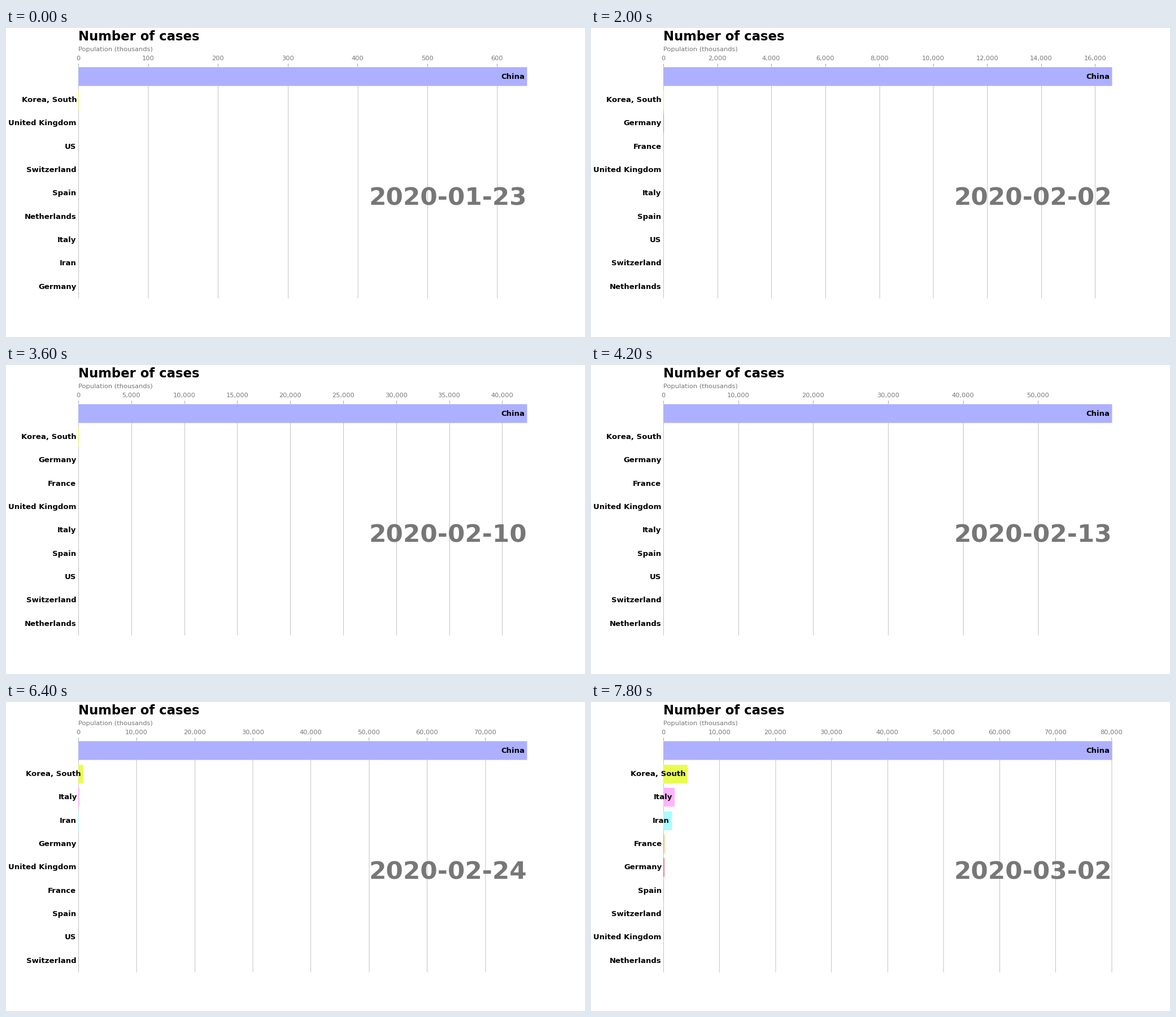
Write a matplotlib script that moves like this. It is 1025 by 547 pixels and loops after 8 s.

```python
import numpy as np
import matplotlib.pyplot as plt
from matplotlib.animation import FuncAnimation
from matplotlib.ticker import StrMethodFormatter

WIDTH, HEIGHT = 1025, 547
DAYS, STEP_MS = 40, 200
START = np.datetime64("2020-01-23")
GREY = "#777777"

# Bars and grid sit on whole cells of a plot area 837 wide and 434.88 high.
CELLS = 837
EDGE = 0.498                       # half a bar plus its margin, in rows
ROW_CELLS = 434.88 / (9 + 2 * EDGE)

COLORS = {
    "China": "#adb0ff", "Italy": "#ffb3ff", "Spain": "#90d595",
    "Germany": "#e48381", "Iran": "#aafbff", "France": "#f7bb5f",
    "Korea, South": "#eafb50", "Netherlands": "#adb0ff",
    "Switzerland": "#ffb3ff", "US": "#e48381", "United Kingdom": "#aafbff",
}

# (day, cases) turning points, with steady exponential growth between them.
GROWTH = {
    "China": [(0, 643), (4, 2877), (5, 5509), (6, 6087), (10, 16630),
              (14, 30587), (18, 42354), (20, 44759), (21, 59895),
              (22, 66358), (25, 72434), (32, 77241), (39, 80136)],
    "Korea, South": [(0, 1), (4, 4), (7, 4), (10, 15), (18, 27), (27, 31),
                     (28, 104), (32, 833), (39, 4335)],
    "Italy": [(8, 2), (15, 3), (28, 3), (29, 20), (32, 229), (39, 2036)],
    "Iran": [(27, 2), (29, 18), (32, 61), (39, 1501)],
    "France": [(1, 2), (6, 5), (15, 6), (16, 11), (33, 14), (39, 191)],
    "Germany": [(4, 1), (5, 4), (7, 4), (10, 10), (33, 17), (39, 159)],
    "Spain": [(9, 1), (17, 2), (32, 2), (33, 6), (39, 120)],
    "United Kingdom": [(8, 2), (15, 3), (18, 8), (31, 9), (32, 13),
                       (34, 13), (39, 40)],
    "Switzerland": [(33, 1), (39, 42)],
    "Netherlands": [(35, 1), (39, 18)],
    "US": [(DAYS, 1)],
}


def cases(name, day):
    days, counts = zip(*GROWTH[name])
    if day < days[0]:
        return 0
    return int(np.exp(np.interp(day, days, np.log(counts))) + 1e-6)


def snap(value, cell):
    return np.floor(np.asarray(value) / cell + 0.5) * cell


dpi = HEIGHT / 8
# The tiny addition keeps the pixel width from rounding down.
fig, ax = plt.subplots(figsize=(WIDTH / dpi + 1e-9, 8), dpi=dpi)
fig.subplots_adjust(left=0.125, right=0.9, bottom=0.125, top=0.88)

rows = np.arange(10)
lower = snap(rows - 0.4 + EDGE, 1 / ROW_CELLS) - EDGE
upper = snap(rows + 0.4 + EDGE, 1 / ROW_CELLS) - EDGE


def draw(day):
    ax.clear()
    counts = {name: cases(name, day) for name in GROWTH}
    # Ties rank in reverse alphabetical order from the top.
    names = sorted(sorted(counts), key=counts.get)[-10:]
    values = [counts[name] for name in names]
    top = values[-1]
    cell = top / CELLS

    ax.barh(lower, snap(values, cell), upper - lower, align="edge",
            color=[COLORS[name] for name in names], snap=False)
    for row, name, value in zip(rows, names, values):
        ax.text(value - top / 200, row, name, size=14, weight="bold",
                ha="right", va="center")

    ax.text(1, 0.4, str(START + day), transform=ax.transAxes, color=GREY,
            size=46, weight="bold", ha="right")
    ax.text(0, 1.06, "Population (thousands)", transform=ax.transAxes,
            color=GREY, size=12)
    ax.text(0, 1.15, "Number of cases", transform=ax.transAxes,
            size=24, weight="bold", va="top")

    ax.set_xlim(0, top)
    ax.set_ylim(-EDGE, 9 + EDGE)
    ticks = ax.get_xticks()
    ticks = ticks[(ticks >= 0) & (ticks <= top)]
    ax.vlines(snap(ticks, cell) + cell / 2, -EDGE, 9 + EDGE,
              color="#b0b0b0", lw=0.8, zorder=0.5, snap=False)

    ax.xaxis.set_major_formatter(StrMethodFormatter("{x:,.0f}"))
    ax.xaxis.set_ticks_position("top")
    ax.tick_params(axis="x", colors=GREY, labelsize=12)
    ax.set_yticks([])
    ax.set_frame_on(False)
    return []


anim = FuncAnimation(fig, draw, frames=DAYS, init_func=lambda: draw(0),
                     interval=STEP_MS, repeat=True, repeat_delay=0)
plt.show()
```
